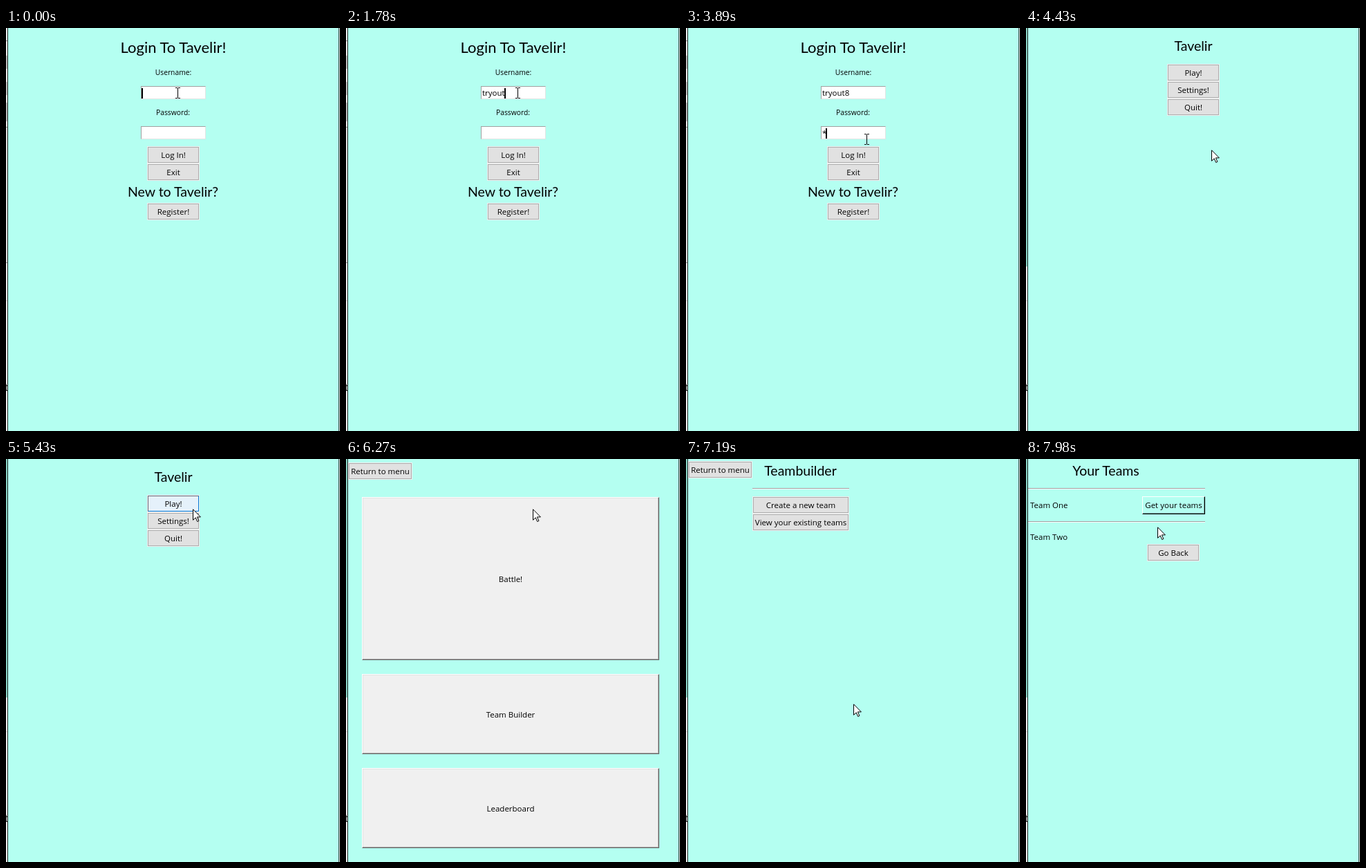
An HTML page for the animation above (8 s loop, 483 by 583 pixels).

```html
<!DOCTYPE html>
<html lang="en">
<head>
<meta charset="utf-8">
<title>Login flow</title>
<style>
  html, body { margin: 0; width: 100%; height: 100%; overflow: hidden; }
  body { position: relative; background: #b4fff1; color: #000; font: 11.5px "Open Sans", sans-serif; }
  body *, .entry::after { animation: 8s step-end infinite; }
  section, section > *, .edge, .strip, .mouse { position: absolute; box-sizing: border-box; white-space: pre; }
  section { inset: 0; visibility: hidden; }

  /* Text centred on --x, --y */
  .label, h1 {
    left: calc(var(--x) * 1px - 120px); top: calc(var(--y) * 1px - 15px);
    width: 240px; margin: 0; line-height: 30px; text-align: center;
  }
  .small { font-size: 10.3px; }
  .left { text-align: left; left: 6px; }
  h1 { font: 19.5px/30px Lato, sans-serif; }
  h1.big { font-size: 22px; }

  .btn {
    width: 74px; height: 23px; line-height: 21px; text-align: center;
    background: #e1e1e1; border: 1px solid #adadad; box-shadow: 0 0 0 1px #f0f0f0;
  }
  .panel {
    left: 23px; width: 430px; display: grid; place-items: center; background: #f0f0f0;
    border: 1px solid; border-color: #fff #696969 #696969 #fff;
    box-shadow: inset -1px -1px #a0a0a0, inset 1px 1px #e3e3e3;
  }
  .raised {
    left: 168px; top: 54px; width: 91px; height: 26px; line-height: 24px; text-align: center;
    border: 1px solid; border-color: #fff #000 #000 #fff; box-shadow: inset -1px -1px #6b9990;
  }
  .rule { height: 2px; background: #a0a0a0; border-bottom: 1px solid #fff; }
  .entry {
    left: 195px; width: 94px; height: 19px; padding-left: 1px; line-height: 18px;
    background: #fff; border: 1px solid; border-color: #a0a0a0 #e3e3e3 #e3e3e3 #a0a0a0;
  }
  .entry::after {
    content: ""; display: inline-block; width: 2px; height: 15px; margin-left: -1px;
    vertical-align: -4px; background: #000; opacity: 0;
  }
  .entry i { font-style: normal; font-size: 0; }

  /* Typing */
  .k1 { animation-name: k1; } @keyframes k1 { 15.375%, to { font-size: 11.5px; } }
  .k2 { animation-name: k2; } @keyframes k2 { 17.5%, to { font-size: 11.5px; } }
  .k3 { animation-name: k3; } @keyframes k3 { 19.375%, to { font-size: 11.5px; } }
  .k4 { animation-name: k4; } @keyframes k4 { 20.375%, to { font-size: 11.5px; } }
  .k5 { animation-name: k5; } @keyframes k5 { 22.25%, to { font-size: 11.5px; } }
  .k6 { animation-name: k6; } @keyframes k6 { 32%, to { font-size: 11.5px; } }
  .k7 { animation-name: k7; } @keyframes k7 { 37%, to { font-size: 11.5px; } }

  .user::after { animation-name: user-caret; }
  .pass::after { animation-name: pass-caret; }
  @keyframes user-caret {
    0%, 7.75%, 19.375%, 30.125% { opacity: 1; }
    3.75%, 15.375%, 26.125%, 33.875%, to { opacity: 0; }
  }
  @keyframes pass-caret {
    33.875%, 44.5% { opacity: 1; }
    40.75%, 52.375%, to { opacity: 0; }
  }

  /* Screens */
  #login { animation-name: login; }
  #menu { animation-name: menu; }
  #play { animation-name: play; }
  #builder { animation-name: builder; }
  #teams { animation-name: teams; }
  @keyframes login { 0% { visibility: visible; } 54.375%, to { visibility: hidden; } }
  @keyframes menu { 54.375% { visibility: visible; } 78.375%, to { visibility: hidden; } }
  @keyframes play { 78.375% { visibility: visible; } 89.875%, to { visibility: hidden; } }
  @keyframes builder { 89.875% { visibility: visible; } 99.75%, to { visibility: hidden; } }
  @keyframes teams { 99.75%, to { visibility: visible; } }

  /* Button hover and press */
  .enter { animation-name: enter; }
  .start { animation-name: start; }
  .options { animation-name: options; }
  .quit { animation-name: quit; }
  .view { animation-name: view; }
  @keyframes enter {
    51.66% { background: #e5f1fb; border-color: #0078d7; }
    53.375%, to { background: #cce4f7; border-color: #005499; }
  }
  @keyframes quit {
    64.95% { background: #e5f1fb; border-color: #0078d7; }
    66.9%, to { background: #e1e1e1; border-color: #adadad; }
  }
  @keyframes options {
    66.9% { background: #e5f1fb; border-color: #0078d7; }
    67.875%, to { background: #e1e1e1; border-color: #adadad; }
  }
  @keyframes start {
    67.875%, to { background: #e5f1fb; border-color: #6b6b78 #0078d7 #0078d7 #6b6b78; }
  }
  @keyframes view {
    96.75% { background: #e5f1fb; border-color: #0078d7; }
    98.875%, to { background: #cce4f7; border-color: #005499; }
  }

  /* Window edges and what shows beside them */
  .edge { top: 0; bottom: 0; width: 1px; background: #1c2422; }
  .strip { left: 0; top: 0; width: 2px; height: 583px; overflow: hidden;
    background: linear-gradient(#e4e8ea 18px, #888 0 19px, #e6e6e6 0 40px, #b8b8b8 0 59px,
      #e6e6e6 0 78px, #bcbcbc 0 97px, #e6e6e6 0 108px, #b8b8b8 0 135px, #e6e6e6 0 143px,
      #888 0 144px, #dcdcdc 0 339px, #888 0 340px, #e8e8e8 0 394px, #ccc 0 395px, #e8e8e8 0); }
  .strip::after { content: "t"; position: absolute; left: -2px; top: 510px; font-size: 15px; line-height: 19px; }
  .shade { height: 345px; background: #86cfc1; animation-name: shade; visibility: hidden; }
  @keyframes shade { 55.375%, to { visibility: visible; } }

  /* Pointer */
  .mouse { left: 0; top: 0; width: 1px; height: 1px; overflow: visible; animation-name: move; }
  .beam { animation-name: beam; }
  .arrow { animation-name: arrow; }
  @keyframes move {
    0% { transform: translate(248px, 94px); }
    41.9% { transform: translate(248px, 94px); animation-timing-function: steps(6); }
    48.625% { transform: translate(261px, 161px); }
    49.5% { transform: translate(261px, 161px); animation-timing-function: steps(4); }
    52.375% { transform: translate(268px, 176px); }
    62.025% { transform: translate(268px, 176px); animation-timing-function: steps(6); }
    67.875% { transform: translate(270px, 72px); }
    80.29% { transform: translate(270px, 72px); animation-timing-function: steps(9); }
    88.9% { transform: translate(242px, 354px); }
    92.9% { transform: translate(242px, 354px); animation-timing-function: steps(4); }
    96.75%, to { transform: translate(190px, 98px); }
  }
  @keyframes beam {
    0%, 47.5% { visibility: visible; }
    43%, 50.2%, to { visibility: hidden; }
  }
  @keyframes arrow {
    0%, 47.5% { visibility: hidden; }
    43%, 50.2%, to { visibility: visible; }
  }
</style>
</head>
<body>
  <section id="login">
    <h1 class="big" style="--x:242;--y:28">Login To Tavelir!</h1>
    <div class="label small" style="--x:242;--y:64">Username:</div>
    <div class="entry user" style="top:84px"><i class="k1">t</i><i class="k2">ry</i><i class="k3">o</i><i class="k4">u</i><i class="k5">t</i><i class="k6">8</i></div>
    <div class="label small" style="--x:241.5;--y:122">Password:</div>
    <div class="entry pass" style="top:142px"><i class="k7">*</i></div>
    <div class="btn enter" style="left:205px;top:172px">Log In!</div>
    <div class="btn" style="left:205px;top:197px">Exit</div>
    <h1 style="--x:241.5;--y:237">New to Tavelir?</h1>
    <div class="btn" style="left:205px;top:254px">Register!</div>
  </section>

  <section id="menu">
    <h1 style="--x:242;--y:26">Tavelir</h1>
    <div class="btn start" style="left:205px;top:53px">Play!</div>
    <div class="btn options" style="left:205px;top:78px">Settings!</div>
    <div class="btn quit" style="left:205px;top:103px">Quit!</div>
  </section>

  <section id="play">
    <div class="btn" style="left:4px;top:6px;width:91px">Return to menu</div>
    <div class="panel" style="top:55px;height:236px">Battle!</div>
    <div class="panel" style="top:311px;height:116px">Team Builder</div>
    <div class="panel" style="top:447px;height:116px">Leaderboard</div>
  </section>

  <section id="builder">
    <div class="btn" style="left:4px;top:4px;width:91px">Return to menu</div>
    <h1 style="--x:165.5;--y:16.5">Teambuilder</h1>
    <div class="rule" style="left:96px;top:42px;width:140px"></div>
    <div class="btn" style="left:97px;top:55px;width:138px">Create a new team</div>
    <div class="btn view" style="left:97px;top:80px;width:138px">View your existing teams</div>
  </section>

  <section id="teams">
    <h1 style="--x:115.5;--y:16.5">Your Teams</h1>
    <div class="rule" style="left:3px;top:42px;width:256px"></div>
    <div class="label left" style="--y:67">Team One</div>
    <div class="raised">Get your teams</div>
    <div class="rule" style="left:3px;top:90px;width:256px"></div>
    <div class="label left" style="--y:113">Team Two</div>
    <div class="btn" style="left:176px;top:124px">Go Back</div>
  </section>

  <div class="strip"><div class="shade"></div></div>
  <div class="edge" style="left:2px"></div>
  <div class="edge" style="left:481px"></div>
  <div class="edge" style="left:482px;background:#e2f6f2"></div>

  <svg class="mouse">
    <path class="beam" d="M-3-7.5H0M1-7.5H4M.5-7V7M-3 7.5H0M1 7.5H4" stroke="#000" fill="none"/>
    <path class="arrow" d="M.5 .8V16.3L4.2 12.8L6.7 18.5L8.9 17.5L6.4 11.9H11.4Z" fill="#fff" stroke="#000"/>
  </svg>
</body>
</html>
```
